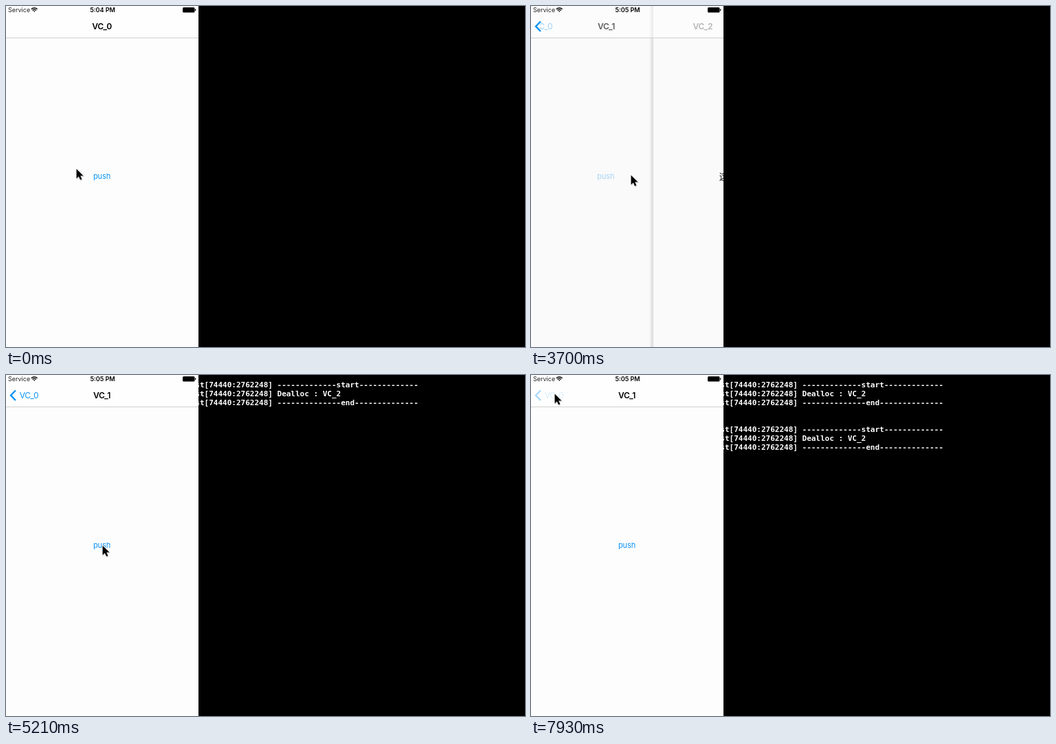
An HTML page for the animation above (8000 ms loop, 755x497 px).

```html
<!DOCTYPE html>
<html lang="en">
<head>
<meta charset="utf-8">
<title>Navigation stack</title>
<style>
  html, body { margin: 0; width: 100%; height: 100%; overflow: hidden; background: #000; }
  svg { display: block; width: 755px; height: 497px; }
  text { font-family: Inter, Roboto, sans-serif; white-space: pre; }
  .title, .back { font-size: 12px; letter-spacing: -.25px; text-anchor: middle; }
  .title { font-weight: 600; }
  .back, .push { fill: #0b93f6; }
  .push { font-size: 11px; letter-spacing: -.1px; text-anchor: middle; }
  .status { font-size: 9px; }
  .last { font: 12.6px "Noto Sans CJK SC", "Noto Sans CJK", sans-serif; text-anchor: middle; fill: #1c1c1c; }
  .log text { font: bold 11px "DejaVu Sans Mono", monospace; fill: #fff; }
</style>
</head>
<body>
<svg viewBox="0 0 755 497" xmlns="http://www.w3.org/2000/svg">
  <defs>
    <clipPath id="phone"><rect width="280" height="497"/></clipPath>
    <clipPath id="console"><rect x="280" width="475" height="497"/></clipPath>
    <clipPath id="backArea"><rect x="13" y="14" width="267" height="32"/></clipPath>
    <linearGradient id="edge">
      <stop offset="0" stop-opacity="0"/>
      <stop offset="1" stop-opacity="1"/>
    </linearGradient>
  </defs>
  <rect width="755" height="497"/>
  <g class="log" id="log" clip-path="url(#console)"></g>

  <g clip-path="url(#phone)">
    <rect width="280" height="497" fill="#fdfdfd"/>
    <text class="push" id="lowPush" y="252">push</text>
    <rect id="dim" width="280" height="497"/>
    <g id="high">
      <rect id="shadow" x="-6" width="6" height="497" fill="url(#edge)"/>
      <rect id="page" width="280" height="497"/>
      <text class="push" id="highPush" x="139.5" y="252">push</text>
      <text class="last" id="last" x="140" y="252.5">这是最后一个了</text>
    </g>

    <rect width="280" height="46" fill="#fff" opacity=".4"/>
    <rect y="46" width="280" height="1" fill="#d0d0d0"/>
    <text class="title" id="lowTitle" y="34"></text>
    <text class="title" id="highTitle" y="34"></text>
    <g clip-path="url(#backArea)">
      <text class="back" id="prevBack" y="34">VC_0</text>
      <text class="back" id="lowBack" y="34"></text>
    </g>
    <path id="chevron" d="M14 22.5L7 29.7L14 37" fill="none" stroke="#0b93f6" stroke-width="2.4"/>

    <text class="status" x="3" y="9" fill="#222">Service</text>
    <g fill="none" stroke="#111" stroke-width="1.4">
      <path d="M36.8 4.6Q41.2 .8 45.6 4.6M38.5 6.5Q41.2 4.2 43.9 6.5"/>
      <path d="M39.9 7.4L41.2 9L42.5 7.4Q41.2 6.5 39.9 7.4Z" fill="#111" stroke="none"/>
    </g>
    <text class="status" id="clock" x="140.5" y="9" font-weight="600" text-anchor="middle"></text>
    <rect x="257" y="2" width="17.5" height="7.5" rx="1.5"/>
    <rect x="275" y="4.2" width="1.2" height="3" rx=".6"/>
  </g>

  <g id="cursor">
    <path d="M1 2V16L4 13.5L6.5 18L9.5 16.8L7.5 12H12Z" opacity=".2"/>
    <path d="M.5 .5V14.5L3.8 11.6L6 16.4L8.4 15.3L6.2 10.6H10.6Z" stroke="#fff" stroke-width="1.3" paint-order="stroke"/>
  </g>
</svg>
<script>
const LOOP = 8000, WIDTH = 280, CENTER = 139.5, RATE = 11;

// origin: zero time of the spring; show: first visible slide
const moves = [
  { press: 2160, show: 2260, end: 2960, origin: 2078, low: 0, push: true },
  { press: 3550, show: 3700, end: 4430, origin: 3585, low: 1, push: true },
  { press: 4550, show: 4640, end: 5210, origin: 4635, low: 1, push: false },
  { press: 5870, show: 5940, end: 6640, origin: 5757, low: 1, push: true },
  { press: 6760, show: 6790, end: 7510, origin: 6785, low: 1, push: false },
  { press: 7930, show: 8000, end: 8000, origin: 8000, low: 0, push: false }
];
const cursorPath = [
  [0, 102, 237], [1440, 102, 237], [1900, 134, 253], [2340, 134, 253],
  [2960, 145, 246], [3700, 145, 246], [4400, 24, 27], [4670, 24, 27],
  [5210, 140, 248], [5870, 140, 248], [6180, 64, 89], [6640, 34, 33],
  [6820, 34, 33], [7510, 34, 27], [LOOP, 34, 27]
];
const logTimes = [5120, 7330];

const el = {};
document.querySelectorAll("[id]").forEach(n => el[n.id] = n);
const clamp = v => Math.max(0, Math.min(1, v));
const fade = (n, a) => n.setAttribute("opacity", clamp(a).toFixed(3));
const moveTo = (n, x, y = 0) => n.setAttribute("transform", `translate(${x.toFixed(2)} ${y.toFixed(2)})`);
const setText = (n, s) => { if (n.textContent !== s) n.textContent = s; };

const dash = n => "-".repeat(n);
const logLines = [dash(13) + "start" + dash(13), "Dealloc : VC_2", dash(14) + "end" + dash(14)];
const logBlocks = logTimes.map((_, b) => {
  const g = document.createElementNS("http://www.w3.org/2000/svg", "g");
  logLines.forEach((line, i) => {
    const text = document.createElementNS(g.namespaceURI, "text");
    text.setAttribute("x", 275.3);
    text.setAttribute("y", 18 + b * 65 + i * 13);
    text.textContent = "st[74440:2762248] " + line;
    g.append(text);
  });
  el.log.append(g);
  return g;
});

// Distance left to the resting place, from 1 to 0
function spring(ms) {
  const x = Math.max(0, ms) / 1000 * RATE;
  return (1 + x) * Math.exp(-x);
}

// q: how far the upper page is off to the right, 0 to 1
function stackAt(t) {
  let s = { low: 0, q: 1, push: true, pressed: false, sliding: false };
  for (const m of moves) {
    if (t < m.press) break;
    const sliding = t >= m.show && t < m.end;
    if (t < m.show) s = { ...s, push: m.push, pressed: true, sliding };
    else {
      const rest = sliding ? spring(t - m.origin) : 0;
      s = { low: m.low, q: m.push ? rest : 1 - rest, push: m.push, pressed: false, sliding };
    }
    if (t >= m.end && m.push && m.low === 0) s = { ...s, low: 1, q: 1 };
  }
  return s;
}

function drawStack(t) {
  const { low, q, push, pressed, sliding } = stackAt(t);
  const p = 1 - q;
  const popping = sliding && !push;
  const pushing = sliding && push;
  const backPressed = pressed && !push;

  moveTo(el.lowPush, CENTER - 84 * p);
  fade(el.lowPush, push && (pressed || sliding) ? .35 : 1);
  fade(el.dim, .09 * p * p);
  moveTo(el.high, WIDTH * q);
  fade(el.shadow, pushing ? .22 * q : popping ? .16 : 0);
  el.page.setAttribute("fill", pushing && p < .5 ? "#fafafa" : "#fefefe");
  fade(el.highPush, low === 0 ? 1 : 0);
  fade(el.last, low === 1 ? 1 : 0);

  const slideX = CENTER - 106 * Math.pow(p, 1.25);
  setText(el.lowTitle, "VC_" + low);
  setText(el.lowBack, "VC_" + low);
  setText(el.highTitle, "VC_" + (low + 1));
  moveTo(el.lowTitle, slideX);
  moveTo(el.lowBack, slideX);
  moveTo(el.highTitle, CENTER + .62 * WIDTH * q);
  fade(el.lowTitle, q);
  fade(el.highTitle, popping ? 1 - 4 * q : Math.pow(p, 1.25));

  const backAlpha = popping ? 1 - 3 * q : (p - .92) / .08;
  fade(el.lowBack, backPressed && q < .5 ? .3 : backAlpha);
  moveTo(el.prevBack, 33.5 - 44 * p);
  fade(el.prevBack, low === 0 ? 0 : backPressed && q > .5 ? .15 : q * q);
  fade(el.chevron, backPressed ? .35 : popping ? .35 + .65 * q : low === 0 ? (p - .8) / .2 : 1);
}

function drawCursor(t) {
  const i = Math.max(1, cursorPath.findIndex(k => k[0] > t));
  const [t0, x0, y0] = cursorPath[i - 1], [t1, x1, y1] = cursorPath[i];
  const u = clamp((t - t0) / (t1 - t0)), e = u * u * (3 - 2 * u);
  moveTo(el.cursor, x0 + (x1 - x0) * e, y0 + (y1 - y0) * e);
}

function render(t) {
  drawStack(t);
  drawCursor(t);
  setText(el.clock, t < 2500 ? "5:04 PM" : "5:05 PM");
  logBlocks.forEach((g, i) => fade(g, t >= logTimes[i] ? 1 : 0));
}

const start = performance.now();
function tick() {
  render((performance.now() - start) % LOOP);
  requestAnimationFrame(tick);
}
tick();
</script>
</body>
</html>
```
